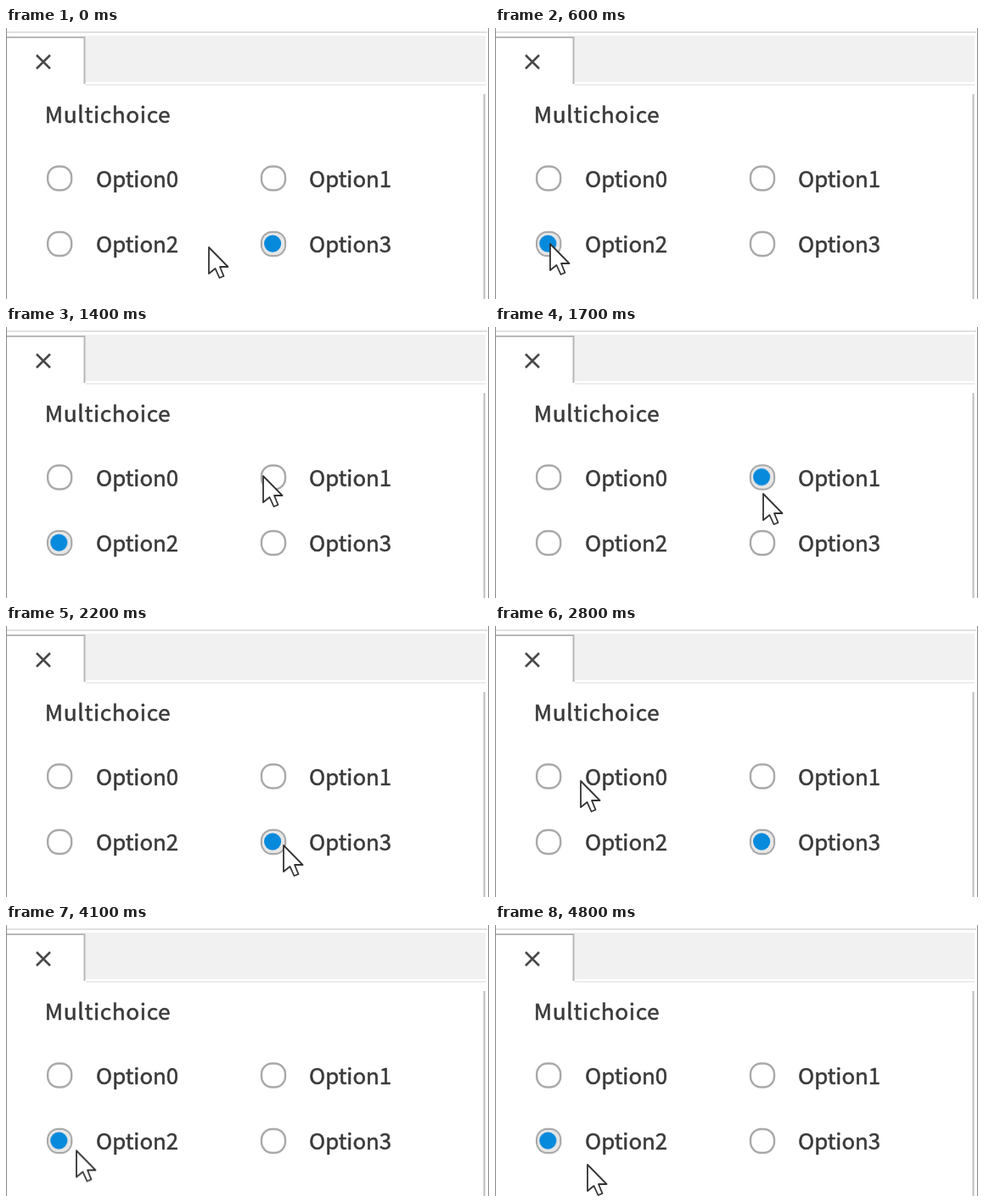
An HTML page for the animation above (4.9 s loop, 569 by 320 pixels).

```html
<!DOCTYPE html>
<html lang="en">
<head>
<meta charset="utf-8">
<title>Radio choices</title>
<style>
html, body { margin: 0; width: 100%; height: 100%; overflow: hidden; background: #fff; }
svg { display: block; width: 100%; height: 100%; }
text {
  font: 25.8px "Noto Sans CJK JP", "Noto Sans CJK SC", "Noto Sans CJK", "Noto Sans", sans-serif;
  fill: #3a3a3a;
  stroke: #3a3a3a;
  stroke-width: .55px;
}
.title { font-size: 26.3px; letter-spacing: .6px; }
.soft { filter: blur(.5px); }
.ring { fill: #fff; stroke: #a9a9a9; stroke-width: 2.4; }
.gap { fill: #e6e6e6; }
.dot { fill: #078adc; }

.on, #cursor { animation: 4.9s infinite step-end; }
#on0 { animation-name: on0; }
#on1 { animation-name: on1; }
#on2 { animation-name: on2; }
#on3 { animation-name: on3; }
#cursor { animation-name: move; }

@keyframes on0 {
  0%, 77.551% { opacity: 0; }
  59.1836% { opacity: 1; }
  100% { opacity: 0; }
}
@keyframes on1 {
  0%, 42.8571% { opacity: 0; }
  30.6122% { opacity: 1; }
  100% { opacity: 0; }
}
@keyframes on2 {
  0%, 30.6122% { opacity: 0; }
  12.2448%, 77.551% { opacity: 1; }
  100% { opacity: 1; }
}
@keyframes on3 {
  0%, 42.8571% { opacity: 1; }
  12.2448%, 59.1836% { opacity: 0; }
  100% { opacity: 0; }
}

/* The pointer advances once every 100 ms between these places. */
@keyframes move {
  0% { transform: translate(239px, 259px); animation-timing-function: steps(3); }
  6.1224% { transform: translate(138px, 252px); animation-timing-function: steps(2); }
  10.204% { transform: translate(78px, 253px); }
  12.2448% { transform: translate(65px, 255px); animation-timing-function: steps(4); }
  20.4081% { transform: translate(187px, 213px); animation-timing-function: steps(2); }
  24.4897% { transform: translate(255px, 187px); animation-timing-function: steps(2); }
  28.5714% { transform: translate(303px, 176px); }
  30.6122% { transform: translate(311px, 178px); animation-timing-function: steps(2); }
  34.6938% { transform: translate(316px, 197px); animation-timing-function: steps(2); }
  38.7755% { transform: translate(322px, 238px); animation-timing-function: steps(2); }
  42.8571% { transform: translate(327px, 258px); }
  44.8979% { transform: translate(327px, 259px); }
  48.9795% { transform: translate(322px, 260px); }
  51.0204% { transform: translate(290px, 246px); animation-timing-function: steps(3); }
  57.1428% { transform: translate(101px, 183px); }
  59.1836%, 65.3061% { transform: translate(66px, 178px); }
  65.3061% { animation-timing-function: steps(2); }
  69.3877% { transform: translate(100px, 214px); animation-timing-function: steps(2); }
  73.4693% { transform: translate(74px, 257px); animation-timing-function: steps(2); }
  77.551% { transform: translate(63px, 258px); }
  79.5918% { transform: translate(65px, 259px); animation-timing-function: steps(4); }
  87.7551% { transform: translate(101px, 274px); }
  97.9591%, 100% { transform: translate(109px, 283px); }
}
</style>
</head>
<body>
<svg viewBox="0 0 569 320">
  <defs>
    <rect id="ring" class="ring" x="-14" y="-14" width="28" height="28" rx="12.5"/>
    <g id="mark">
      <rect class="gap" x="-13" y="-13" width="26" height="26" rx="11.5"/>
      <circle class="dot" cx="-.9" cy="-.4" r="10.1"/>
    </g>
  </defs>

  <!-- Window edges -->
  <path d="M.5 0V320M568.5 0V320" stroke="#8a8a8a"/>

  <g class="soft">
    <!-- Tab strip -->
    <rect x="1" y="4" width="566" height="2" fill="#e0e0e0"/>
    <rect x="93" y="9" width="472" height="55" fill="#f1f1f1"/>
    <rect x="94" y="66" width="471" height="2" fill="#ececec"/>
    <path d="M1 11H92.5V66" fill="none" stroke="#b8b8b8" stroke-width="2"/>
    <path d="M563.5 78V320" stroke="#bcbcbc" stroke-width="2"/>
    <path d="M36 32L52 48M52 32L36 48" stroke="#484848" stroke-width="2.6"/>

    <text class="title" x="45.8" y="112">Multichoice</text>

    <g transform="translate(63.2 177.5)">
      <use href="#ring"/><use id="on0" class="on" href="#mark"/>
    </g>
    <g transform="translate(315 177.5)">
      <use href="#ring"/><use id="on1" class="on" href="#mark"/>
    </g>
    <g transform="translate(63.2 255)">
      <use href="#ring"/><use id="on2" class="on" href="#mark"/>
    </g>
    <g transform="translate(315 255)">
      <use href="#ring"/><use id="on3" class="on" href="#mark"/>
    </g>

    <text x="106" y="188">Option0</text>
    <text x="357" y="188">Option1</text>
    <text x="106" y="264.5">Option2</text>
    <text x="357" y="264.5">Option3</text>
  </g>

  <g class="soft">
    <path id="cursor" d="M0 0V31L7.5 25L12.5 36L17.5 34L13 23H22.5Z"
      fill="#fff" stroke="#333" stroke-width="1.8" stroke-linejoin="round"/>
  </g>
</svg>
</body>
</html>
```
